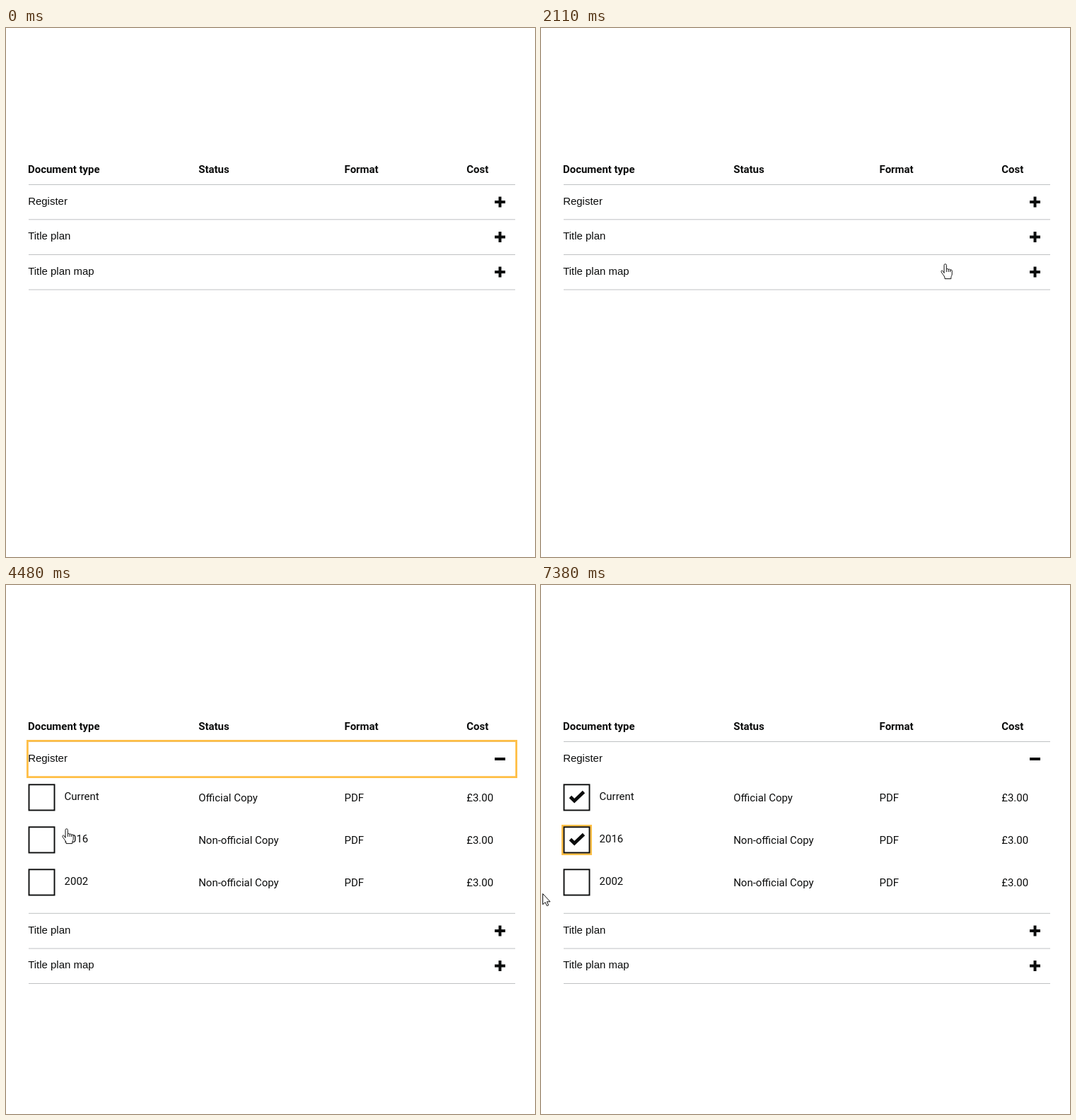
Recreate the animation shown at these times as an HTML page. Size 748 px wide and 748 px high, loop 8000 ms.

```html
<!DOCTYPE html>
<html lang="en">
<head>
<meta charset="utf-8">
<title>Document list</title>
<style>
  html, body { margin: 0; width: 100%; height: 100%; overflow: hidden; background: #fff; }
  svg { display: block; width: 100vw; height: 100vh; }
  text { font: 14.96px Roboto, sans-serif; fill: #0b0c0c; }
  .head { font-weight: 700; }
  .row { font-family: "Liberation Sans", Arial, sans-serif; }
  .line { fill: #bfc1c3; }
  .icon { fill: #0b0c0c; }
  .ring { fill: none; stroke: #ffbf47; stroke-width: 2.8; }
  .box { fill: #fff; stroke: #0b0c0c; stroke-width: 1.9; }
  .tick { fill: none; stroke: #0b0c0c; stroke-width: 4.8; }
  .cursor { fill: #fff; stroke: #111; stroke-width: 1; stroke-linejoin: round; }
</style>
</head>
<body>
<svg id="stage" viewBox="0 0 748 748" xmlns="http://www.w3.org/2000/svg"></svg>
<script>
const LOOP = 8000, OPEN = 3310, CHECKS = [4960, 6770];
const SHIFT = 193.5;               // height of the opened panel
const COLS = [31, 272.2, 478.6, 651.2];
const stage = document.getElementById('stage');

function add(parent, tag, attrs, text) {
  const el = document.createElementNS('http://www.w3.org/2000/svg', tag);
  for (const key in attrs) el.setAttribute(key, attrs[key]);
  if (text) el.textContent = text;
  parent.appendChild(el);
  return el;
}
const group = parent => add(parent, 'g', {});
const label = (parent, x, y, text, cls = '') => add(parent, 'text', { x, y, class: cls }, text);
const rect = (parent, x, y, width, height, cls) => add(parent, 'rect', { x, y, width, height, class: cls });
const line = (parent, y) => rect(parent, 32, y, 688, 1, 'line');
const show = (el, on) => { el.style.display = on ? '' : 'none'; };

function drawRow(parent, y, title) {
  label(parent, 31.2, y + 28.7, title, 'row');
  rect(parent, 691, y + 23, 15, 4, 'icon');
  return rect(parent, 696.5, y + 17.5, 4, 15, 'icon');
}

// Table
['Document type', 'Status', 'Format', 'Cost'].forEach((name, i) => label(stage, COLS[i], 204.8, name, 'head'));
line(stage, 221);
const plus = drawRow(stage, 221, 'Register');

const panel = group(stage);
const options = ['Current', '2016', '2002'].map((name, i) => {
  const y = 282 + 60 * i;
  const ring = rect(panel, 30.4, y - 1.6, 40.2, 40.2, 'ring');
  rect(panel, 32.5, y + 0.3, 36, 36.2, 'box');
  const tick = add(panel, 'path', {
    d: `M41.4 ${y + 17.6}L47.2 ${y + 23.2}L60.5 ${y + 10.4}`, class: 'tick'
  });
  label(panel, 82.6, y + 22.2, name);
  [i ? 'Non-official Copy' : 'Official Copy', 'PDF', '£3.00']
    .forEach((text, c) => label(panel, COLS[c + 1], y + 24, text));
  return { ring, tick };
});

const lower = group(stage);
line(lower, 270.3);
drawRow(lower, 270.5, 'Title plan');
line(lower, 320);
drawRow(lower, 320, 'Title plan map');
line(lower, 369.5);

const focus = rect(stage, 30.4, 220.4, 691.2, 51.2, 'ring');

// Pointers, both with the hot spot at 0,0
const arrow = add(stage, 'path', {
  class: 'cursor', d: 'M.5.5V15.8L4 12.6L6.4 17.7L8.7 16.7L6.4 11.8H11Z'
});
const hand = add(stage, 'path', {
  class: 'cursor',
  d: 'M-1 13.5V2.4a1.65 1.65 0 0 1 3.3 0V8q1.5-1.5 2.8.4q1.5-1 2.6.6q2-.8 2.5 1.1' +
     'V15c0 2-1.2 3-1.4 4.5V21.6H0V20C-.5 17.5-4.2 14-5.1 11.6' +
     'C-5.5 10-3.5 9.4-2.6 10.8ZM2.3 8V12M5.1 8.4V12M7.7 9V12'
});

// Pointer moves: each runs through evenly spaced points in a number of steps
const moves = [];
const move = (start, end, steps, ...points) => moves.push({ start, end, last: steps - 1, points });
move(500, 1290, 15, [627, 715], [627, 548], [618, 415], [592, 312], [581, 243]);
move(1600, 2110, 9, [581, 246], [573, 288], [571, 333]);
move(2390, 2500, 4, [571, 328], [573, 286]);
move(2690, 2810, 3, [574, 278], [574.5, 242]);
move(4150, 4468, 8, [565, 244], [455, 330], [240, 405], [115, 385], [85, 344]);
move(4514, 4650, 4, [72, 328], [50, 297]);
move(4960, 5320, 5, [50, 297], [47, 303], [38, 315], [15, 332], [-40, 345]);
move(6350, 6530, 4, [-1, 361], [44, 362]);
move(7140, 7380, 5, [41, 372], [22, 408], [2, 436]);

function pointerAt(t) {
  const m = moves.filter(({ start }) => start <= t).pop();
  if (!m) return null;
  const part = Math.min(1, (t - m.start) / (m.end - m.start));
  const pos = Math.floor(part * m.last + 1e-6) / m.last * (m.points.length - 1);
  const i = Math.min(Math.floor(pos), m.points.length - 2);
  const [a, b] = m.points.slice(i, i + 2);
  return a.map((v, k) => v + (b[k] - v) * (pos - i));
}

function isClickable(x, y, open) {
  if (!open) return y > 221 && y < 370;
  return x > 31 && (y < 272 || x < 135);
}

function render(t) {
  const open = t >= OPEN;
  show(panel, open);
  show(plus, !open);
  lower.setAttribute('transform', `translate(0 ${open ? SHIFT : 0})`);
  show(focus, open && t < CHECKS[0]);
  options.forEach(({ ring, tick }, i) => {
    const checked = t >= CHECKS[i];
    show(tick, checked);
    show(ring, checked && !(t >= CHECKS[i + 1]));
  });

  const spot = pointerAt(t);
  const over = spot && isClickable(spot[0], spot[1], open);
  show(hand, over);
  show(arrow, spot && !over);
  if (spot) (over ? hand : arrow).setAttribute('transform', `translate(${spot[0]} ${spot[1]})`);
}

const began = performance.now();
function frame() {
  render((performance.now() - began) % LOOP);
  requestAnimationFrame(frame);
}
render(0);
requestAnimationFrame(frame);
</script>
</body>
</html>
```
